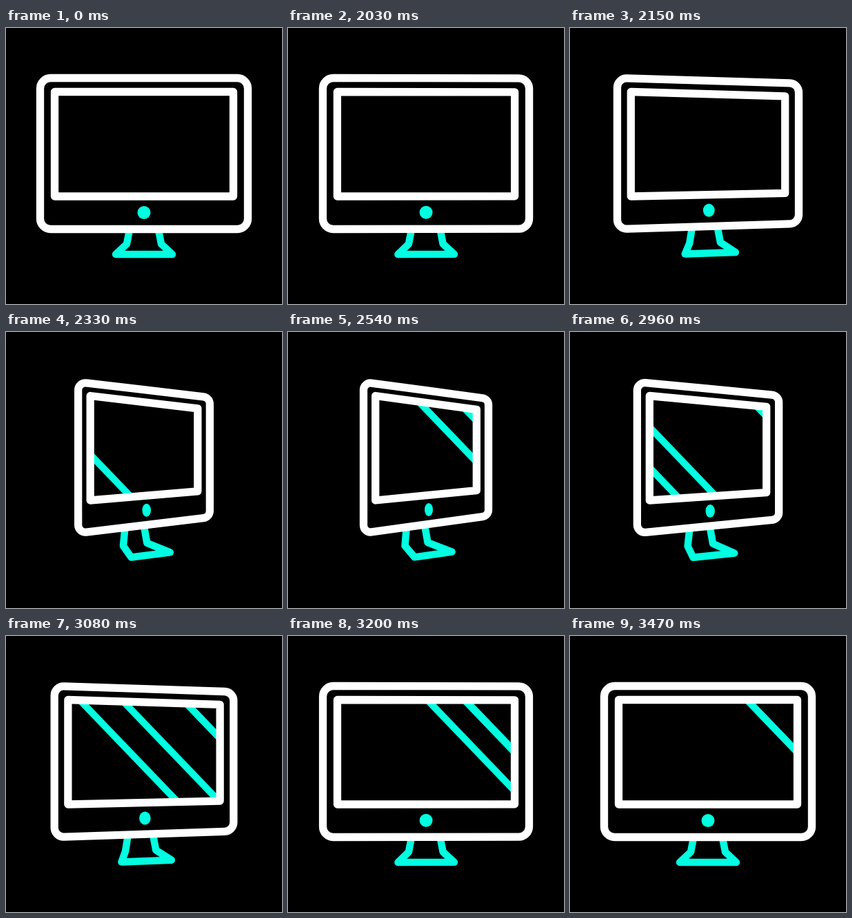
Animation, 400 px wide and 400 px high, one loop 3.65 s. Source, as an HTML page with a canvas:

```html
<!DOCTYPE html>
<html>
<head>
<meta charset="utf-8">
<style>
html, body { margin: 0; height: 100%; overflow: hidden; background: #000; }
canvas { display: block; }
</style>
</head>
<body>
<canvas id="stage" width="400" height="400"></canvas>
<script>
const ctx = document.getElementById('stage').getContext('2d');
const LOOP = 3650, STEP = 30, REST = 2000;
const WHITE = '#fff', AQUA = '#00ffe1';
const MID = 200, HORIZON = 180.5;

const lerp = (a, b, k) => a + (b - a) * k;

function ease(t, start, duration) {
  const k = Math.min(1, Math.max(0, (t - start) / duration));
  return k * k * (3 - 2 * k);
}

// Upright rectangle that narrows while its right edge recedes to the horizon
function panel(half, turnedHalf, top, bottom, turn) {
  const w = lerp(half, turnedHalf, turn);
  const recede = y => lerp(y, HORIZON, 0.226 * turn);
  return [
    [MID - w, top], [MID + w, recede(top)],
    [MID + w, recede(bottom)], [MID - w, bottom]
  ];
}

// Mirrored legs on a base that slides sideways and tilts with the turn
function stand(turn) {
  const point = (side, half, y, shift) => [
    MID + shift * turn + side * half * lerp(1, 0.66, turn),
    y - (5.5 + side * half * 0.094) * turn
  ];
  const leg = side => [
    point(side, 20.5, 290, -15),
    point(side, 25, 313, -14),
    point(side, 41, 328, 10.5)
  ];
  return [...leg(-1), ...leg(1).reverse()];
}

function polyline(points) {
  ctx.beginPath();
  points.forEach(p => ctx.lineTo(...p));
}

function roundedPath(points, radius) {
  const [a, b] = points;
  ctx.beginPath();
  ctx.moveTo((a[0] + b[0]) / 2, (a[1] + b[1]) / 2);
  for (let i = 1; i <= 4; i++) {
    ctx.arcTo(...points[i % 4], ...points[(i + 1) % 4], radius);
  }
  ctx.closePath();
}

function stroke(color, width) {
  ctx.strokeStyle = color;
  ctx.lineWidth = width;
  ctx.stroke();
}

// Two diagonal glints, the second trailing the first
function sweep(t, start, duration, end) {
  for (const delay of [0, 76]) {
    const x = 168 + lerp(-174, end, ease(t, start + delay, duration));
    polyline([[x - 192, -32], [x + 192, 368]]);
    stroke(AQUA, 10);
  }
}

function draw(t) {
  const turn = ease(t, REST, 400) - ease(t, 2850, 380);
  const screen = panel(129.5, 73.3, 92.5, 244, turn);
  const bezel = panel(150.5, 90.5, 72.5, 291.5, turn);

  ctx.clearRect(0, 0, 400, 400);
  ctx.lineJoin = 'round';

  polyline(stand(turn));
  stroke(AQUA, 10.5);

  ctx.save();
  polyline(screen);
  ctx.clip();
  sweep(t, 2145, 460, 161);
  sweep(t, 2648, 760, 235);
  ctx.restore();

  polyline(screen);
  ctx.closePath();
  stroke(WHITE, 11.3);
  roundedPath(bezel, lerp(15, 10, turn));
  stroke(WHITE, 11.3);

  ctx.beginPath();
  ctx.ellipse(MID + 4 * turn, 267.5 - 10 * turn, 9.5 - 3.5 * turn, 9.5, 0, 0, 2 * Math.PI);
  ctx.fillStyle = AQUA;
  ctx.fill();
}

function tick() {
  const t = performance.now() % LOOP;
  // Motion advances in 30 ms steps
  draw(t < REST + STEP ? 0 : t - (t - REST) % STEP);
  requestAnimationFrame(tick);
}
tick();
</script>
</body>
</html>
```
